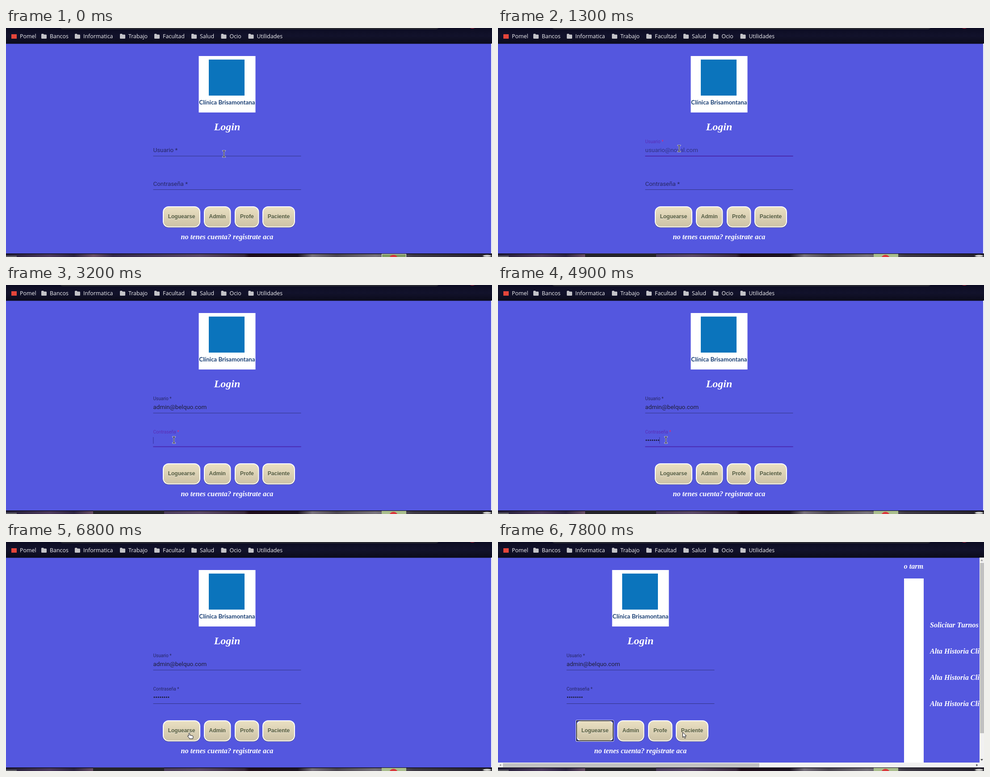
Animation of 1088 by 515 pixels, one loop 8000 ms. Source, as an HTML page:

```html
<!DOCTYPE html>
<html lang="es">
<head>
<meta charset="utf-8">
<title>Login</title>
<style>
  html, body { margin: 0; width: 100%; height: 100%; overflow: hidden; background: #5457df; }
  svg { display: block; width: 1088px; height: 515px; }
  text { white-space: pre; }
  .bookmark { font: 12.4px "Open Sans", sans-serif; fill: #f2f2f4; }
  .title { font: italic bold 24px "Liberation Serif", serif; fill: #fff; text-anchor: middle; }
  .link { font: italic bold 16.2px "Liberation Serif", serif; fill: #fff; }
  .brand { font: bold 13.4px Lato, sans-serif; fill: #1c4175; text-anchor: middle; }
  .field { font: 13.4px Roboto, sans-serif; }
  .button { font: bold 12px "Liberation Sans", sans-serif; text-anchor: middle; }
</style>
</head>
<body>
<svg id="stage" viewBox="0 0 1088 515" xmlns="http://www.w3.org/2000/svg"></svg>
<script>
const LOOP = 8000, STEP = 100;
const FOCUS_USER = 500, FILL_USER = 1900, FOCUS_PASS = 3200, BLUR = 6800;
const PRESS = 6900, RELEASE = 7200, SLIDE = 7800;
const KEYSTROKES = [3400, 3600, 4000, 4100, 4400, 4700, 4900, 5200];
const PITCH = 4.55;

// time, x, y of the pointer's centre
const POINTER = [
  [0, 488, 283], [100, 503, 302], [200, 450, 287], [300, 396, 272],
  [600, 400, 272], [900, 403, 271], [1300, 405.5, 271], [1400, 407, 276],
  [1600, 440, 276], [1700, 458, 277], [1900, 461, 276], [2000, 454, 291],
  [2100, 430, 318], [2200, 400, 338], [2300, 382, 346], [2400, 376, 347],
  [3200, 376, 348.5], [5600, 376, 347.5], [6100, 463.5, 434], [6200, 459, 449],
  [6400, 450, 447], [6500, 432, 442], [6600, 418, 438], [6800, 412, 436],
  [7200, 414, 435], [7500, 415, 434], [7600, 415.5, 433.5], [7800, 417.5, 435]
];

const rect = (x, y, w, h, fill, extra = '') =>
  `<rect x="${x}" y="${y}" width="${w}" height="${h}" fill="${fill}" ${extra}/>`;
const text = (cls, x, y, str, extra = '') =>
  `<text class="${cls}" x="${x}" y="${y}" ${extra}>${str}</text>`;
const stops = list => list.map(([at, color]) =>
  `<stop offset="${at}" stop-color="${color}"/>`).join('');

const folder = x => `<path fill="#c3c3c8" d="M${x} 14.5q0-1.5 1.5-1.5h3l1.5 1.7h4.5q1.5 0 1.5 1.5v6.3
  q0 1.5-1.5 1.5h-9q-1.5 0-1.5-1.5z"/>`;

const bookmarks = [[79, 'Bancos'], [154, 'Informatica'], [255, 'Trabajo'], [332, 'Facultad'],
  [415, 'Salud'], [481.5, 'Ocio'], [542.5, 'Utilidades']]
  .map(([x, name]) => folder(x) + text('bookmark', x + 19, 23, name)).join('');

const field = (id, y, name) => `
  <line x1="329.5" x2="660.5" y1="${y + 9}" y2="${y + 9}" stroke="#000" stroke-opacity=".42"/>
  <line id="${id}Line" y1="${y + 9.2}" y2="${y + 9.2}" stroke="#4a26ae" stroke-width="1.7"/>
  <g id="${id}Label"><text class="field">${name} <tspan>*</tspan></text></g>`;

const button = (id, x, w, name) => `<g id="${id}">
  ${rect(x, 402, w, 47, '#1c1b18', 'rx="13"')}
  ${rect(x + 1, 402, w - 2, 45.5, 'url(#sand)', 'rx="12" stroke="#fff" stroke-width="2"')}
  ${text('button', x + w / 2, 428.8, name, 'fill="#fff" fill-opacity=".6"')}
  ${text('button', x + w / 2, 428, name, 'fill="#505739"')}</g>`;

const wallpaper = `
  ${rect(0, 507, 1088, 8, 'url(#night)')}
  ${rect(0, 507, 1088, 1.5, '#0d0b18')}
  ${rect(0, 512, 24, 3, '#5c5c63')}
  ${rect(1066, 510, 22, 5, '#3c3b40')}
  <ellipse cx="1077" cy="512.5" rx="9" ry="2.2" fill="#d6d6d2"/>
  <g id="task">${rect(195, 507, 159, 8, '#25242a')}</g>
  ${rect(841, 508, 55, 7, '#a9bd8c')}
  <g id="frame">${rect(841.5, 508.5, 54, 8, '#7f9a62', 'stroke="#e9ebe2"')}</g>
  <circle cx="867.5" cy="520" r="10" fill="#d8383c"/>`;

const scrollbars = `
  ${rect(1078, 35, 10, 472, '#f1f1f1')}${rect(0, 496, 1088, 11, '#f1f1f1')}
  ${rect(1079, 47, 9, 383, '#c1c1c1')}${rect(11, 497.5, 574, 9, '#c1c1c1')}
  <path fill="#a3a3a3" d="M1080 43l3-4 3 4zM7 499l-4 2.8 4 2.8z"/>
  <path fill="#505050" d="M1080 488l3 4 3-4zM1070.500 499l4 2.800-4 2.800z"/>`;

const nextPage = `
  <g clip-path="url(#column)">${text('link', 904, 60, 'lo tarmi')}</g>
  ${rect(909, 82, 44, 414, '#fff')}
  ${text('link', 967, 192, 'Solicitar Turnos')}
  ${[250.5, 309.5, 368.5].map(y => text('link', 967, y, 'Alta Historia Clinica')).join('')}`;

const pointers = `
  <g id="beam" fill="none" stroke-linecap="square">
    <path id="beamShape" stroke="#e8e8f0" stroke-width="2.600" d="M-2.500-7h1.500l1 1 1-1h1.500M0-6v12M-2.500 7h1.500l1-1 1 1h1.500"/>
    <path stroke="#15151c" stroke-width="1.200" d="M-2.500-7h1.500l1 1 1-1h1.500M0-6v12M-2.500 7h1.500l1-1 1 1h1.500"/>
  </g>
  <path id="hand" fill="#fff" stroke="#15151c" stroke-linejoin="round"
    d="M-3-5.500q1.300-1.500 2.500 0v4l5.500 1q2 .5 2 2.500l-.8 4.500h-7.500l-1-2.500-3.200-2.800q-.5-1.700 1.200-1.500l1.300.8z"/>
  <path id="arrow" fill="#fff" stroke="#15151c" d="M-4-7v11.500l2.700-2.400 1.900 4.400 2-.9-1.900-4.300h3.700z"/>`;

const stage = document.getElementById('stage');
stage.innerHTML = `
  <defs>
    <linearGradient id="sand" x2="0" y2="1">${stops([[0, '#eae0c2'], [1, '#ccc2a6']])}</linearGradient>
    <linearGradient id="bar" x2="0" y2="1">${stops([[0, '#0c0c22'], [.5, '#12122b'], [1, '#0b0b1b']])}</linearGradient>
    <linearGradient id="night">${stops([[0, '#211c35'], [.09, '#4c3a5e'], [.14, '#2b2340'],
      [.18, '#6a5068'], [.22, '#34294a'], [.4, '#5a4968'], [.49, '#38283c'], [.5, '#200d1b'], [.6, '#1c1422'],
      [.63, '#77717c'], [.68, '#4b4650'], [.76, '#77737b'], [.84, '#3d3944'], [1, '#24202c']])}</linearGradient>
    <clipPath id="page">${rect(0, 35, 1088, 472, '#000')}</clipPath>
    <clipPath id="column">${rect(909, 35, 44, 47, '#000')}</clipPath>
  </defs>
  ${rect(0, 0, 1088, 515, '#5457df')}
  ${rect(0, 0, 1088, 35.5, 'url(#bar)')}
  ${rect(120, -20, 850, 23, '#292a33', 'rx="8"')}
  <ellipse cx="1044" cy="-1" rx="6" ry="2.200" fill="#a8253a"/>
  ${rect(12, 14, 12, 10, '#e4453a')}${text('bookmark', 31, 23, 'Pomel')}
  ${bookmarks}
  <g clip-path="url(#page)">
    ${rect(1086, 35, 2, 472, '#f4f4fa')}
    <g id="form">
      ${rect(431.5, 63, 127, 127, '#fff')}
      ${rect(454, 71, 80, 81, '#0b74bc')}
      ${text('brand', 495, 171.5, 'Clínica Brisamontana')}
      ${text('title', 495, 230, 'Login')}
      ${field('user', 279, 'Usuario')}
      ${text('field', 329.5, 279, 'usuario@noxal.com', 'id="hint" fill="#000"')}
      ${text('field', 329.5, 279, 'admin@belquo.com', 'id="email" fill="#1f2038"')}
      ${field('pass', 354.5, 'Contraseña')}
      <g id="dots" fill="#1a1b35">${KEYSTROKES.map((_, i) =>
        `<circle cx="${332 + i * PITCH}" cy="349" r="1.600"/>`).join('')}</g>
      ${rect(0, 342, 1, 15, '#35309a', 'id="caret"')}
      ${button('login', 351, 84, 'Loguearse')}
      ${button('admin', 443, 60.5, 'Admin')}
      ${button('profe', 512, 54.5, 'Profe')}
      ${button('paciente', 574, 73, 'Paciente')}
      <g id="ring" fill="none">
        <rect x="350.500" y="400.800" width="84.500" height="47.500" rx="1.500" stroke="#fff"/>
        <rect x="351.800" y="402" width="82" height="45" rx="1" stroke="#101018" stroke-width="1.600"/>
      </g>
      ${text('link', 495, 475, 'no tenes cuenta? registrate aca', 'text-anchor="middle"')}
    </g>
    <g id="next">${nextPage}${scrollbars}</g>
  </g>
  ${wallpaper}
  ${pointers}`;

const el = id => document.getElementById(id);
const show = (id, on) => el(id).setAttribute('visibility', on ? 'visible' : 'hidden');
const move = (id, x, y) => el(id).setAttribute('transform', `translate(${x} ${y})`);
const progress = (t, start, span) => Math.min(1, Math.max(0, (t - start) / span));
const ease = p => 1 - (1 - p) ** 3;

function drawField(id, y, focused, raised, grown) {
  const label = el(id + 'Label');
  label.setAttribute('transform',
    `translate(329.5 ${y - 20.5 * raised}) scale(${1 - .25 * raised})`);
  label.setAttribute('fill', focused ? '#5a2db5' : '#000');
  label.setAttribute('fill-opacity', focused ? 1 : .56);
  label.querySelector('tspan').setAttribute('fill', focused ? '#e3286f' : '#000');
  const line = el(id + 'Line');
  line.setAttribute('x1', 495 - 165.5 * grown);
  line.setAttribute('x2', 495 + 165.5 * grown);
  show(id + 'Line', focused && grown > 0);
}

function draw(time) {
  const t = Math.floor(time / STEP) * STEP;

  const userFocused = t >= FOCUS_USER && t < FOCUS_PASS;
  const passFocused = t >= FOCUS_PASS && t < BLUR;
  const opened = t - FOCUS_USER + STEP;
  drawField('user', 279, userFocused, ease(progress(opened, 0, 400)), ease(progress(opened, 0, 300)));
  drawField('pass', 354.5, passFocused, t >= FOCUS_PASS ? 1 : 0, 1);

  el('hint').setAttribute('fill-opacity', .42 * progress(opened, 133, 400));
  show('hint', t < FILL_USER);
  show('email', t >= FILL_USER);

  const typed = KEYSTROKES.filter(k => t >= k).length;
  [...el('dots').children].forEach((dot, i) =>
    dot.setAttribute('visibility', i < typed ? 'visible' : 'hidden'));
  el('caret').setAttribute('x', 329.3 + typed * PITCH);
  show('caret', passFocused && !(t >= 5800 && t < 6400));

  const pressed = t >= PRESS && t < RELEASE ? 1 : 0;
  move('login', 0, pressed);
  move('ring', 0, pressed);
  show('ring', t >= PRESS);

  const slid = t >= SLIDE;
  move('form', slid ? -176 : 0, 0);
  show('next', slid);
  show('task', t >= 700);
  show('frame', t < 700);

  const [, x, y] = POINTER.filter(p => p[0] <= t).pop();
  const kind = slid ? 'arrow' : t >= 6100 ? 'hand' : 'beam';
  for (const id of ['beam', 'hand', 'arrow']) show(id, id === kind);
  move(kind, x, y);
}

const start = performance.now();
function tick() {
  draw((performance.now() - start) % LOOP);
  requestAnimationFrame(tick);
}
tick();
</script>
</body>
</html>
```
